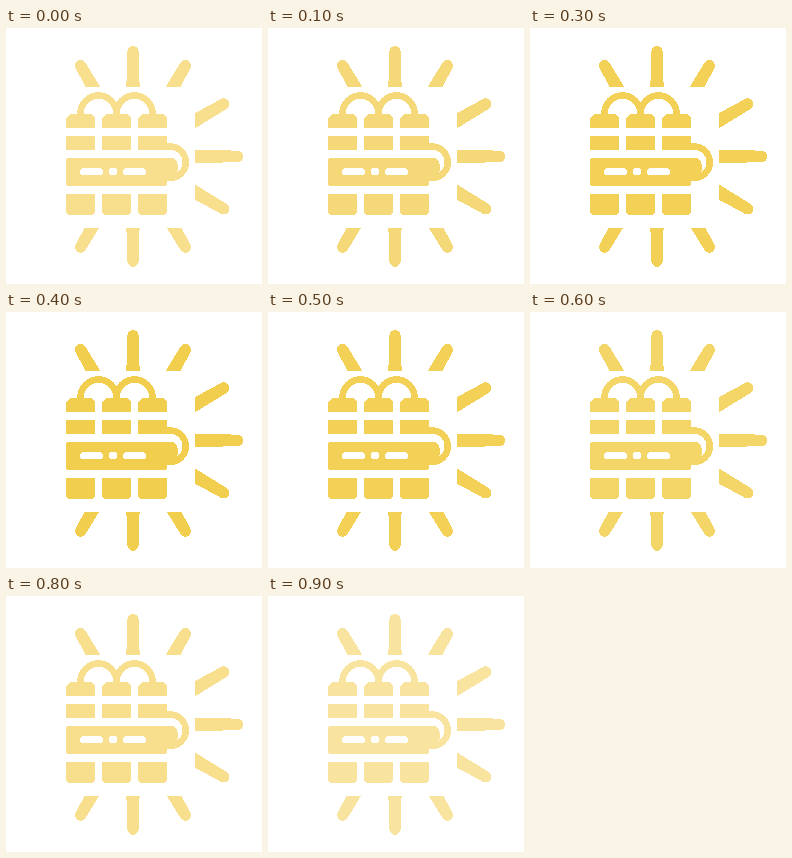
These frames come from a looping animation (256x256 px, 1 s). An HTML page:

```html
<!DOCTYPE html>
<html lang="en">
<head>
<meta charset="utf-8">
<title>Dynamite</title>
<style>
  html, body { margin: 0; width: 100%; height: 100%; overflow: hidden; background: #fff; }
  svg { display: block; width: 100vw; height: 100vh; shape-rendering: crispEdges; }
  .art { color: #f7df8d; animation: glow 1s step-end infinite; }
  .wire { fill: none; stroke: currentColor; stroke-width: 6.6; }
  @keyframes glow {
    0%   { color: #f7df8d; }
    10%  { color: #f5d979; }
    20%  { color: #f4d567; }
    30%  { color: #f3d056; }
    40%  { color: #f2ce4f; }
    50%  { color: #f3d056; }
    60%  { color: #f4d567; }
    70%  { color: #f5d979; }
    80%  { color: #f7df8d; }
    90%, 100% { color: #f8e49f; }
  }
</style>
</head>
<body>
<svg viewBox="0 0 256 256">
  <defs>
    <path id="ray" d="M60-6.9L104.7-5.7A5.7 5.7 0 0 1 104.7 5.7L60 6.9Z"/>
    <g id="stick">
      <path d="M0 100V90L4 86H25L29 90V100Z"/>
      <path d="M0 108H29V122H0Z"/>
      <path d="M0 166H29V183Q29 187 25 187H4Q0 187 0 183Z"/>
    </g>
  </defs>
  <g class="art" fill="currentColor">
    <g transform="translate(127 128.4)">
      <use href="#ray" transform="rotate(-120)"/>
      <use href="#ray" transform="rotate(-90)"/>
      <use href="#ray" transform="rotate(-60)"/>
      <use href="#ray" transform="rotate(-30)"/>
      <use href="#ray"/>
      <use href="#ray" transform="rotate(30)"/>
      <use href="#ray" transform="rotate(60)"/>
      <use href="#ray" transform="rotate(90)"/>
      <use href="#ray" transform="rotate(120)"/>
    </g>
    <path fill="#fff" d="M54 59H189V200H54Z"/>

    <use href="#stick" x="60"/>
    <use href="#stick" x="96"/>
    <use href="#stick" x="132"/>
    <path class="wire" d="M74.5 87V85.5a18 18 0 0 1 36 0a18 18 0 0 1 36 0V87"/>

    <path class="wire" d="M161 118.5H164A15.7 15.7 0 0 1 164 150H161"/>
    <path d="M63 130H167Q172 133 172 139Q172 145 168 150H161V155Q161 158 158 158H63Q60 158 60 155V133Q60 130 63 130Z"/>
    <g fill="#fff">
      <rect x="74" y="140" width="23" height="7" rx="3.5"/>
      <circle cx="107" cy="143.5" r="4"/>
      <rect x="117" y="140" width="23" height="7" rx="3.5"/>
    </g>
  </g>
</svg>
</body>
</html>
```
